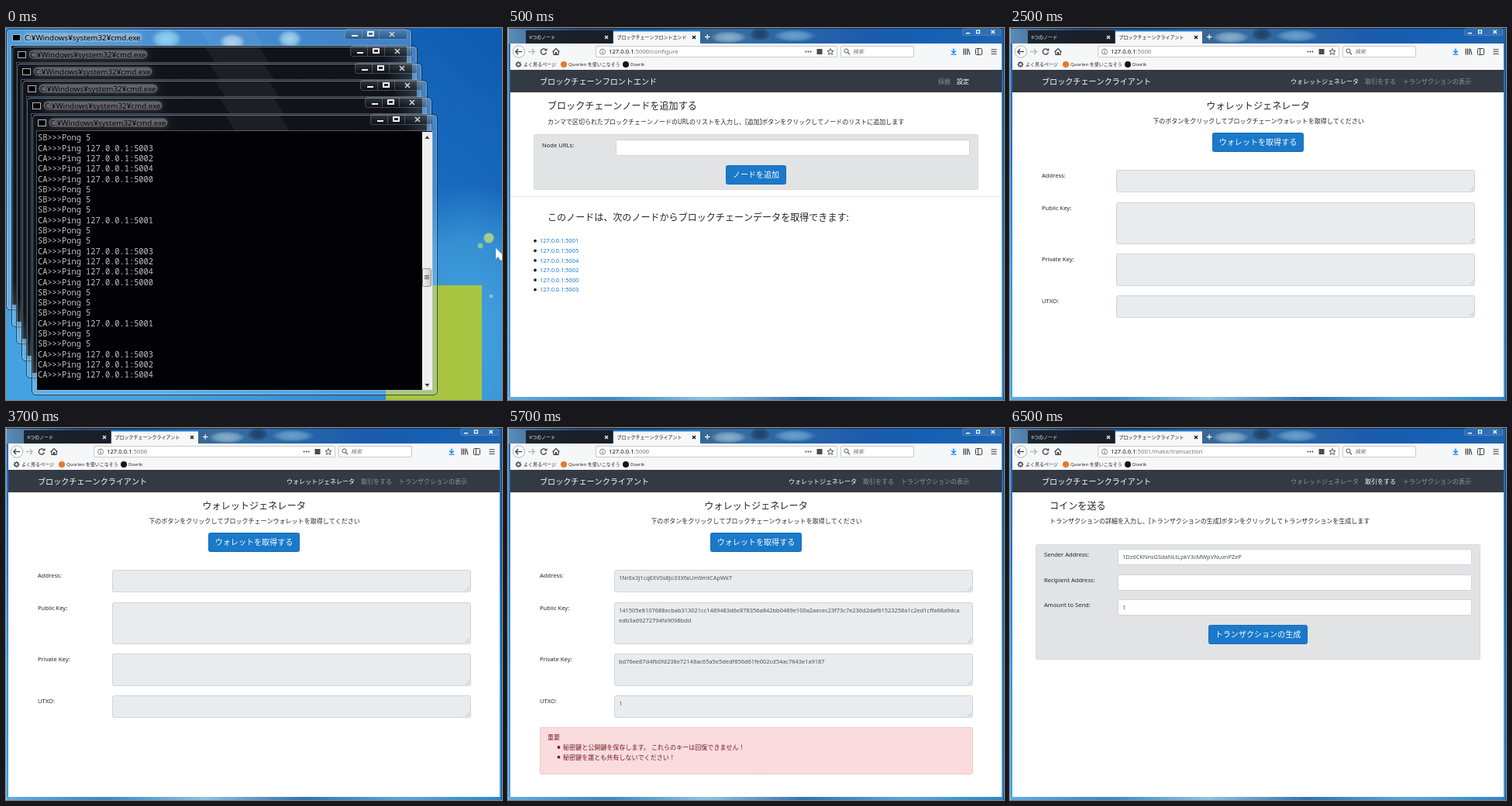
Write an HTML page with a canvas that moves like this. It is 640 px wide and 480 px high and loops after 8000 ms.

```html
<!DOCTYPE html>
<html lang="ja">
<head>
<meta charset="utf-8">
<title>Blockchain demo</title>
<style>
html, body { margin: 0; width: 100%; height: 100%; overflow: hidden; background: #2a80c8; }
canvas { display: block; width: 640px; height: 480px; }
</style>
</head>
<body>
<canvas id="stage" width="640" height="480"></canvas>
<script>
const ctx = document.getElementById('stage').getContext('2d');
const SANS = '"Noto Sans", "Noto Sans CJK JP", "Noto Sans CJK", sans-serif';
const MONO = '"Noto Sans Mono", "DejaVu Sans Mono", monospace';
const LOOP = 8000;
const DARK = '#212529', BLUE = '#1a79c9', MUTED = '#90959a';

// y is the visual centre of the line
function text(str, x, y, size, color = DARK, { font = SANS, style = '', align = 'left' } = {}) {
  ctx.font = `${style} ${size}px ${font}`;
  ctx.textAlign = align;
  ctx.fillStyle = color;
  ctx.fillText(str, x, y + size * 0.37);
  return ctx.measureText(str).width;
}

function rect(x, y, w, h, color) {
  ctx.fillStyle = color;
  ctx.fillRect(x, y, w, h);
}

function box(x, y, w, h, r, fill, stroke) {
  ctx.beginPath();
  ctx.roundRect(x + 0.5, y + 0.5, w - 1, h - 1, r);
  if (fill) { ctx.fillStyle = fill; ctx.fill(); }
  if (stroke) { ctx.strokeStyle = stroke; ctx.lineWidth = 1; ctx.stroke(); }
}

function disc(x, y, r, color) {
  ctx.beginPath();
  ctx.arc(x, y, r, 0, Math.PI * 2);
  ctx.fillStyle = color;
  ctx.fill();
}

function ring(x, y, r, color, width = 1, from = 0, to = Math.PI * 2) {
  ctx.beginPath();
  ctx.arc(x, y, r, from, to);
  ctx.strokeStyle = color;
  ctx.lineWidth = width;
  ctx.stroke();
}

function line(points, color, width = 1) {
  ctx.beginPath();
  points.forEach(([x, y]) => ctx.lineTo(x, y));
  ctx.strokeStyle = color;
  ctx.lineWidth = width;
  ctx.stroke();
}

function poly(points, color) {
  ctx.beginPath();
  points.forEach(([x, y]) => ctx.lineTo(x, y));
  ctx.closePath();
  ctx.fillStyle = color;
  ctx.fill();
}

function gradient(x0, y0, x1, y1, ...colors) {
  const g = ctx.createLinearGradient(x0, y0, x1, y1);
  colors.forEach((c, i) => g.addColorStop(i / (colors.length - 1), c));
  return g;
}

function blob(x, y, rx, ry, rgb, alpha) {
  ctx.save();
  ctx.translate(x, y);
  ctx.scale(rx, ry);
  const g = ctx.createRadialGradient(0, 0, 0, 0, 0, 1);
  g.addColorStop(0, `rgba(${rgb},${alpha})`);
  g.addColorStop(0.6, `rgba(${rgb},${alpha * 0.7})`);
  g.addColorStop(1, `rgba(${rgb},0)`);
  ctx.fillStyle = g;
  ctx.fillRect(-1, -1, 2, 2);
  ctx.restore();
}

function captionButtons(x, y) {
  const edge = 'rgba(190,205,220,.3)';
  box(x, y, 81, 14, 3, gradient(0, y, 0, y + 14, 'rgba(120,130,140,.3)', 'rgba(0,0,0,.35)'), edge);
  line([[x + 22.5, y + 1], [x + 22.5, y + 13]], edge);
  line([[x + 44.5, y + 1], [x + 44.5, y + 13]], edge);
  rect(x + 9, y + 8, 8, 2, '#f4f4f4');
  ctx.strokeStyle = '#f4f4f4';
  ctx.lineWidth = 2;
  ctx.strokeRect(x + 30, y + 4, 7, 5);
  line([[x + 58, y + 4], [x + 64, y + 10]], '#d4d8dc', 1.5);
  line([[x + 64, y + 4], [x + 58, y + 10]], '#d4d8dc', 1.5);
}

function titleGlow(x, y, color) {
  ctx.save();
  ctx.shadowColor = color;
  ctx.shadowBlur = 9;
  box(x + 22, y + 5, 154, 12, 6, color);
  ctx.restore();
}

function consoleWindow(i) {
  const x = Math.round(i * 6.55), y = 1 + 22 * i, w = 524, h = 363;
  box(x, y, w, h, 5, 'rgba(165,210,240,.3)', 'rgba(15,25,35,.75)');
  if (i) {
    // blurred console behind the glass
    const shade = 'rgba(8,8,13,.8)', clear = 'rgba(8,8,13,0)';
    rect(x + 1, y + 2, w - 8, 20, gradient(x + 480, 0, x + w - 7, 0, shade, clear));
    rect(x + 1, y + 22, 6, h - 40, gradient(0, y + h - 60, 0, y + h - 18, shade, clear));
  }
  box(x + 1, y + 1, w - 2, h - 2, 4, null, 'rgba(205,230,250,.38)');
  const sheen = x + 250;
  poly([[sheen, y + 2], [sheen + 70, y + 2], [sheen + 83, y + 22], [sheen + 13, y + 22]], 'rgba(255,255,255,.05)');
  titleGlow(x, y, i ? 'rgba(130,132,138,.62)' : 'rgba(165,190,210,.6)');
  rect(x + 8, y + 7, 11, 9, '#b8b8b8');
  rect(x + 9, y + 8, 9, 7, '#000');
  text('C:¥Windows¥system32¥cmd.exe', x + 24, y + 11, 9.8, '#080808');
  captionButtons(x + 437, y);
  rect(x + 7, y + 22, w - 14, h - 29, '#020204');
  ctx.strokeStyle = 'rgba(190,215,235,.35)';
  ctx.lineWidth = 1;
  ctx.strokeRect(x + 6.5, y + 21.5, w - 13, h - 28);
}

function scrollbar() {
  rect(537, 134, 13, 333, '#efefef');
  poly([[540.5, 143], [543.5, 139], [546.5, 143]], '#444');
  poly([[540.5, 459], [543.5, 463], [546.5, 459]], '#444');
  box(537, 310, 12, 24, 2, gradient(537, 0, 549, 0, '#f4f4f4', '#c8c8c8'), '#909090');
  for (let y = 319; y < 325; y += 2) rect(540, y, 6, 1, '#555');
}

function desktop() {
  rect(0, 0, 640, 480, gradient(600, 0, 200, 480, '#0f5db2', '#1a6cc0', '#2c87d2', '#44a2e2'));
  blob(600, 380, 130, 180, '90,190,235', 0.6);
  rect(490, 332, 124, 148, '#a9c440');
  disc(623, 271, 6.5, '#9fce8c');
  disc(612, 281, 3.5, '#86c49a');
  disc(626, 346, 2.5, '#7dbfd8');
  blob(207, 14, 20, 13, '150,225,245', 0.9);
  blob(292, 18, 17, 11, '220,235,240', 0.8);
  blob(366, 14, 16, 12, '190,230,245', 0.85);
  for (let i = 0; i < 6; i++) consoleWindow(i);
  scrollbar();

  const cycle = [5003, 5002, 5004, 5000, 0, 0, 0, 5001, 0, 0];
  for (let i = 0; i < 24; i++) {
    const port = cycle[(i + 9) % 10];
    const msg = port ? `CA>>>Ping 127.0.0.1:${port}` : 'SB>>>Pong 5';
    text(msg, 41, 141.5 + i * 13.3, 10.35, '#c4c4c4', { font: MONO });
  }
  poly([[632, 284], [632, 298], [635, 295], [638, 300], [640, 299], [640, 292]], '#fff');
}

function tab(x, title, active) {
  rect(x, 3, 112, 17, active ? '#f6f7f8' : 'rgba(22,26,32,.88)');
  if (active) rect(x, 3, 112, 1.5, '#0a84ff');
  const c = active ? '#111' : '#f4f4f4';
  text(title, x + 4.5, 11.5, 6, c);
  const cx = x + 104;
  line([[cx - 2, 10], [cx + 2, 14]], c, 1.2);
  line([[cx + 2, 10], [cx - 2, 14]], c, 1.2);
}

function arrow(x, y, dir, color) {
  line([[x - 4 * dir, y], [x + 4 * dir, y]], color, 1.3);
  line([[x + dir, y - 3.5], [x + 4.2 * dir, y], [x + dir, y + 3.5]], color, 1.3);
}

function star(x, y, r) {
  const pts = [];
  for (let i = 0; i <= 10; i++) {
    const a = -Math.PI / 2 + i * Math.PI / 5, d = i % 2 ? r * 0.45 : r;
    pts.push([x + d * Math.cos(a), y + d * Math.sin(a)]);
  }
  line(pts, '#444', 0.9);
}

function toolbar(path) {
  const ink = '#3c3f44';
  rect(3, 20, 634, 34, '#f6f7f8');
  disc(14, 30.5, 8, '#fff');
  ring(14, 30.5, 7.7, '#aaa', 0.9);
  arrow(14, 30.5, -1, ink);
  arrow(30, 30.5, 1, '#b4b5b8');
  ring(46, 30.5, 3.6, ink, 1.3, 0.3, 5.5);
  poly([[47, 29.5], [50.4, 29.5], [50.4, 26]], ink);
  line([[57.5, 31], [62, 26.5], [66.5, 31]], ink, 1.2);
  line([[59, 30.5], [59, 34.3], [65, 34.3], [65, 30.5]], ink, 1.2);
  rect(61, 31, 2, 4, ink);

  box(113, 23, 312, 15, 1.5, '#fff', '#c9cacc');
  ring(122, 30.5, 3.5, '#666', 0.8);
  rect(121.6, 30, 1, 2.6, '#666');
  rect(121.6, 28.3, 1, 1, '#666');
  const w = text('127.0.0.1', 130, 30.5, 7.7, '#0c0c0d');
  text(path, 130 + w, 30.5, 7.7, '#777');
  for (let i = 0; i < 3; i++) disc(384.5 + i * 3, 30.5, 1, '#444');
  rect(398.5, 27, 7, 7, '#4a4a4f');
  star(416, 30.8, 4.3);

  box(429, 23, 95, 15, 1.5, '#fff', '#c9cacc');
  ring(436.5, 29.5, 2.6, '#555', 1);
  line([[438.4, 31.4], [441, 34]], '#555', 1.2);
  text('検索', 445, 30.5, 7, '#777', { style: 'italic' });

  line([[575, 26.5], [575, 32]], '#0a84ff', 1.4);
  line([[572.3, 29.6], [575, 32.3], [577.7, 29.6]], '#0a84ff', 1.4);
  rect(571.5, 33.5, 7, 1.2, '#0a84ff');
  for (let i = 0; i < 3; i++) rect(587.5 + i * 2.3, 26.5, 1.2, 8, ink);
  line([[594, 26.8], [596, 34.5]], ink, 1.1);
  box(603, 26, 9, 9, 1, null, ink);
  rect(606, 27, 1, 7, ink);
  for (let i = 0; i < 3; i++) rect(623.5, 27.3 + i * 2.8, 7, 1, ink);

  ring(13.5, 47, 2.4, ink, 1.3);
  for (let i = 0; i < 8; i++) {
    const a = i * Math.PI / 4;
    disc(13.5 + 3.3 * Math.cos(a), 47 + 3.3 * Math.sin(a), 0.65, ink);
  }
  text('よく見るページ', 20, 47, 6);
  disc(72, 47, 4, '#e8792b');
  text('Quorlen を使いこなそう', 78, 47, 6);
  disc(152, 47, 4, '#181818');
  text('Dovrik', 158, 47, 6);
}

function browser({ title, path, nav }) {
  rect(0, 0, 640, 480, gradient(0, 0, 0, 480, '#2368ae', '#2378c4', '#3396dc', '#3c9ede'));
  rect(0, 0, 640, 20, gradient(0, 0, 640, 0, '#5a8cb8', '#2c4a6c', '#30506e', '#3a6e9e', '#2a66a6', '#1c5cac', '#1560b4', '#2064b0'));
  blob(285, 12, 24, 8, '190,220,235', 0.6);
  blob(370, 10, 28, 8, '160,210,235', 0.55);
  blob(325, 8, 14, 9, '20,35,60', 0.6);
  rect(0, 476, 640, 4, gradient(0, 0, 640, 0, '#63aede', '#3a88c4', '#8cc4e4', '#3274b0', '#5aa8d8', '#2e84c8'));
  rect(0, 0, 640, 1, 'rgba(15,25,40,.7)');
  rect(0, 0, 1, 480, 'rgba(190,225,250,.5)');
  rect(639, 0, 1, 480, 'rgba(15,40,70,.6)');
  rect(3, 20, 634, 456, '#fff');

  tab(23, '6つのノード', false);
  tab(136, title, true);
  rect(254, 10.9, 6.5, 1.2, '#fff');
  rect(256.6, 8.2, 1.2, 6.5, '#fff');
  box(586, 0, 50, 10, 2, 'rgba(255,255,255,.08)', 'rgba(190,215,240,.22)');
  rect(591, 6, 5, 1.4, '#fff');
  ctx.strokeStyle = '#fff';
  ctx.lineWidth = 1.2;
  ctx.strokeRect(604.5, 3, 4, 3.8);
  line([[623.5, 2.8], [628, 7.2]], '#fff', 1.2);
  line([[628, 2.8], [623.5, 7.2]], '#fff', 1.2);
  toolbar(path);

  rect(3, 54, 634, 29, '#343a44');
  text(title, 41, 69, 10.08, '#fff');
  for (const [label, x, on] of nav) text(label, x, 69.3, 8, on ? '#fff' : MUTED);
}

const button = (label, x, y, w) => {
  box(x, y, w, 25, 2, BLUE, '#176fba');
  text(label, x + w / 2, y + 12.5, 10.05, '#fff', { align: 'center' });
};
const panel = (y, h) => box(33, y, 574, h, 2, '#e1e3e5', '#d8dadd');
const label = (str, x, y) => text(str, x, y, 7.6);

function input(y, value = '') {
  box(139, y, 457, 21, 2, '#fff', '#ced4da');
  text(value, 145, y + 10.5, 7.45, '#495057');
}

function area(y, h, lines) {
  box(137, y, 463, h, 2, '#e9ecee', '#ced4da');
  line([[593, y + h - 2], [598, y + h - 7]], '#a8acb0', 0.7);
  line([[596, y + h - 2], [598, y + h - 4]], '#a8acb0', 0.7);
  lines.forEach((s, i) => text(s, 143, y + 10.5 + i * 12.3, 7.45, '#495057'));
}

function configurePage() {
  browser({
    title: 'ブロックチェーンフロントエンド', path: ':5000/configure',
    nav: [['採掘', 555, false], ['設定', 579, true]]
  });
  text('ブロックチェーンノードを追加する', 51, 101, 12.06);
  text('カンマで区切られたブロックチェーンノードのURLのリストを入力し、[追加]ボタンをクリックしてノードのリストに追加します', 51, 121, 8);
  panel(137, 72);
  label('Node URLs:', 44, 151);
  input(144);
  button('ノードを追加', 281, 177, 78);
  rect(3, 217, 634, 1, '#e4e5e6');
  text('このノードは、次のノードからブロックチェーンデータを取得できます:', 51, 244.5, 12.06);
  [5001, 5005, 5004, 5002, 5000, 5003].forEach((port, i) => {
    const y = 274.7 + i * 12.6;
    disc(35, y, 1.9, DARK);
    text(`127.0.0.1:${port}`, 41, y, 7.4, BLUE);
  });
}

const clientNav = active => ['ウォレットジェネレータ', '取引をする', 'トランザクションの表示']
  .map((s, i) => [s, [362, 458, 507][i], i === active]);

const wallet = {
  address: ['1NrEx3J1cqEXVSs8Jo33XfaUm9mtCApWkT'],
  pub: ['141505e8107688ecbab313021cc1489483d6e878356a842bb0489e100a2aecec23f73c7e236d2daf61523258a1c2ed1cffa68a9dca',
    'edb3a69272794fa9098bdd'],
  priv: ['bd76ee87d4fb0fd238e72148ac65a5e5dedf856d61fe002cd54ac7643e1a9187'],
  utxo: ['1']
};

function walletPage(filled) {
  browser({ title: 'ブロックチェーンクライアント', path: ':5000', nav: clientNav(0) });
  text('ウォレットジェネレータ', 320, 101, 12.15, DARK, { align: 'center' });
  text('下のボタンをクリックしてブロックチェーンウォレットを取得してください', 320.5, 120.5, 8.03, DARK, { align: 'center' });
  button('ウォレットを取得する', 261, 135, 118);
  const fields = [
    ['Address:', 183, 29, wallet.address],
    ['Public Key:', 225, 54, wallet.pub],
    ['Private Key:', 291, 42, wallet.priv],
    ['UTXO:', 345, 29, wallet.utxo]
  ];
  for (const [name, y, h, lines] of fields) {
    label(name, 41, y + 7);
    area(y, h, filled ? lines : []);
  }
  if (!filled) return;
  const red = '#721c24';
  box(41, 386, 559, 61, 2, '#fbdcde', '#f5c6cb');
  text('重要', 51, 399.5, 8, red);
  ['秘密鍵と公開鍵を保存します。 これらのキーは回復できません！', '秘密鍵を誰とも共有しないでください！'].forEach((s, i) => {
    const y = 412 + i * 12.7;
    disc(65.5, y, 1.9, red);
    text(s, 71, y, 8.05, red);
  });
}

function transactionPage() {
  browser({ title: 'ブロックチェーンクライアント', path: ':5001/make/transaction', nav: clientNav(1) });
  text('コインを送る', 51, 101, 12.1);
  text('トランザクションの詳細を入力し、[トランザクションの生成]ボタンをクリックしてトランザクションを生成します', 51, 120.5, 8);
  panel(150, 149);
  label('Sender Address:', 44, 163.5);
  input(156, '1Dz6CKNnsGSdaNLtLpkY3cMWpVNuznPZeP');
  label('Recipient Address:', 44, 196);
  input(189);
  label('Amount to Send:', 44, 228.5);
  input(221, '1');
  button('トランザクションの生成', 256, 254, 128);
}

const scenes = [
  [500, desktop],
  [2500, configurePage],
  [4500, () => walletPage(false)],
  [6500, () => walletPage(true)],
  [LOOP, transactionPage]
];

function tick() {
  const t = performance.now() % LOOP;
  scenes.find(([end]) => t < end)[1]();
  requestAnimationFrame(tick);
}
tick();
</script>
</body>
</html>
```
